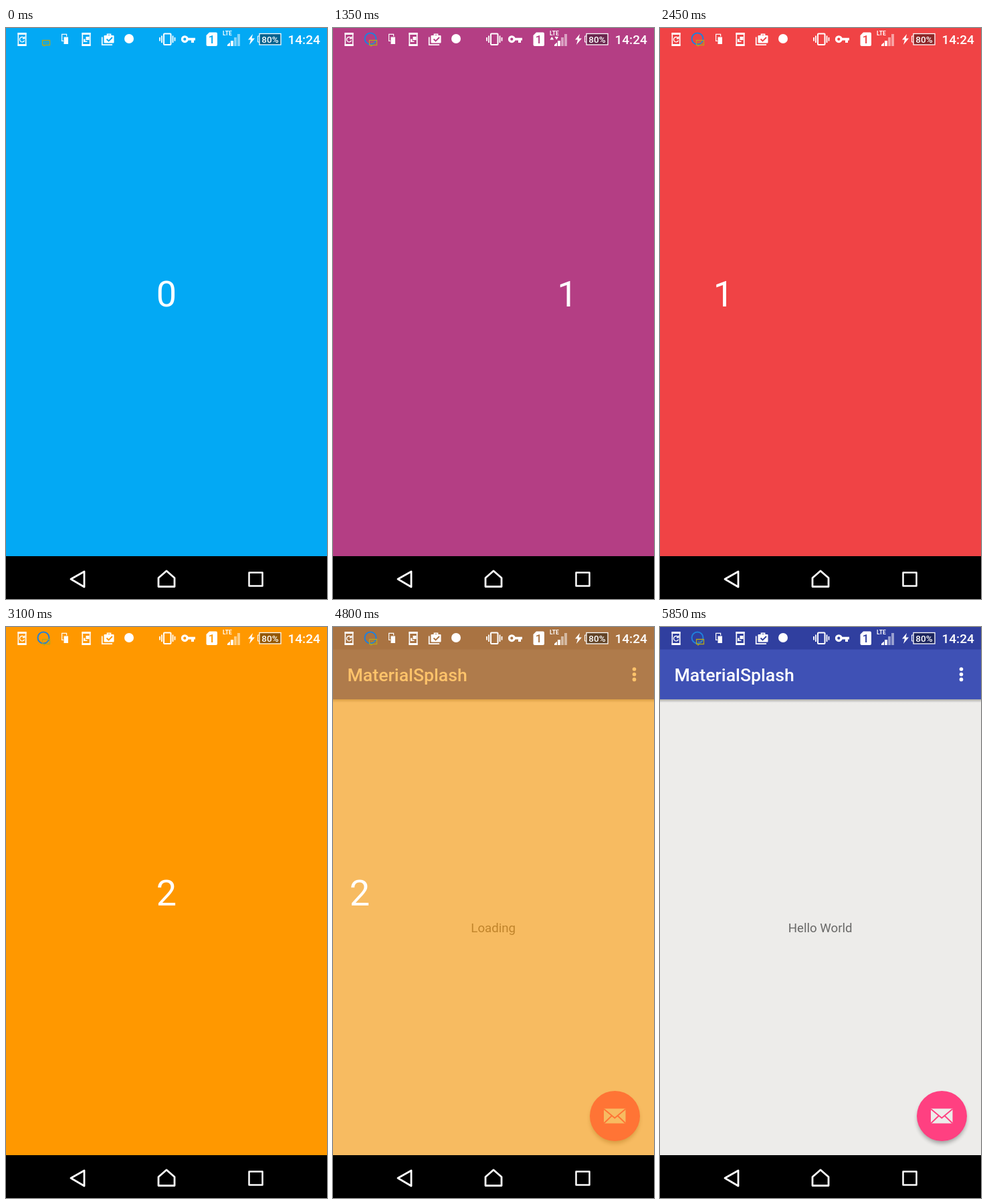
These frames come from a looping animation (480x853 px, 5.9 s). An HTML page:

```html
<!DOCTYPE html>
<html lang="en">
<head>
<meta charset="utf-8">
<title>Splash pager</title>
<style>
  html, body { margin: 0; width: 100%; height: 100%; overflow: hidden; background: #000; }
  svg { display: block; width: 100%; height: 100%; }
  text { font-family: Roboto, sans-serif; }
  .digits text { font-size: 54px; fill: #fff; text-anchor: middle; }
  .title { font-size: 26.67px; font-weight: 500; fill: #fff; }
  .body { font-size: 18.67px; fill: rgba(0, 0, 0, .56); text-anchor: middle; }
  .clock { font-size: 19px; font-weight: 500; }
  .line { fill: none; stroke: #fff; }
</style>
</head>
<body>
<svg viewBox="0 0 480 853">
  <defs>
    <filter id="soft" x="-30%" y="-30%" width="160%" height="160%"><feGaussianBlur stdDeviation="3"/></filter>
    <linearGradient id="edge" x2="0" y2="1">
      <stop stop-opacity=".28"/><stop offset="1" stop-opacity="0"/>
    </linearGradient>
    <mask id="simHole">
      <path d="M304 6.500h10q2 0 2 2v16.500q0 2-2 2h-12.500q-2 0-2-2v-14z" fill="#fff"/>
      <text x="307.500" y="23" font-size="17" font-weight="500" text-anchor="middle">1</text>
    </mask>
    <mask id="caseHole">
      <rect x="140" y="5" width="26" height="24" fill="#fff"/>
      <path d="M150.500 16.500l3 3 5.500-5.500" fill="none" stroke="#000" stroke-width="1.800"/>
    </mask>
  </defs>

  <g id="app">
    <rect width="480" height="789" fill="#edecea"/>
    <rect y="108" width="480" height="5" fill="url(#edge)"/>
    <rect width="480" height="108" fill="#3f51b5"/>
    <rect width="480" height="33.500" fill="#303f9f"/>
    <text class="title" x="21.500" y="81">MaterialSplash</text>
    <g fill="#fff">
      <circle cx="450.500" cy="63" r="2.800"/><circle cx="450.500" cy="70.700" r="2.800"/><circle cx="450.500" cy="78.400" r="2.800"/>
    </g>
    <text class="body" id="message" x="239.700" y="456">Loading</text>
    <circle cx="421.500" cy="735" r="36.500" opacity=".32" filter="url(#soft)"/>
    <circle cx="421.500" cy="730.500" r="37.500" fill="#ff4081"/>
    <rect x="405" y="719.500" width="32.500" height="22" fill="#edecea"/>
    <path d="M405 720l16.300 13.500L437.500 720M405 741.500l11.500-11M437.500 741.500l-11.500-11" fill="none" stroke="#ff4081" stroke-width="1.800"/>
  </g>

  <rect id="cover" width="480" height="789"/>
  <g class="digits" id="digits">
    <text x="240" y="415.500">0</text>
    <text x="720" y="415.500">1</text>
    <text x="1200" y="415.500">2</text>
  </g>

  <g id="status" fill="#fff">
    <path class="line" stroke-width="1.600" d="M18.300 8h11.400v18h-11.400z"/>
    <path d="M17.500 7h13v3h-13zM17.500 24h13v3h-13z"/>
    <path class="line" stroke-width="1.400" d="M27.300 15.200a3.700 3.700 0 1 0 .3 3.300M27.800 12.800v3h-3"/>

    <circle id="badge" cx="56" cy="16" r="8.500" fill="none" stroke="#1f80dc" stroke-width="2"/>
    <path d="M54.500 18.500h11v7h-6.500l-2 1.500v-1.500h-2.500z" fill="none" stroke="#b5a51c" stroke-width="1.300"/>
    <path d="M57 22h6" stroke="#b5a51c" stroke-dasharray="1.500 1"/>

    <path class="line" stroke-width="1.200" d="M86 19.400h-2.400v-10h7v3"/>
    <path d="M86.500 13.500h6.500v10.500h-6.500z"/>

    <path class="line" stroke-width="1.700" d="M114.300 8h11.400v18h-11.400z"/>
    <path d="M113.500 7h13v3h-13zM113.500 24h13v3h-13z"/>
    <path d="M119.500 13h5v5h-5zM116 16.500h2.500v3h3v1.500h-5.500z"/>

    <g mask="url(#caseHole)">
      <rect x="146.500" y="11" width="15" height="11.500" rx="1"/>
      <path class="line" stroke-width="1.700" d="M151.500 12v-2.700h5v2.700M143.700 13.500v11.700h15.300"/>
    </g>
    <circle cx="184" cy="16" r="7"/>

    <rect class="line" x="236" y="8.500" width="10.500" height="16.500" rx="1" stroke-width="2"/>
    <path class="line" stroke-width="1.800" d="M233 11.500v10.500M249.500 11.500v10.500M230 14v5.500M252.500 14v5.500"/>

    <circle class="line" cx="267.300" cy="16.700" r="3.800" stroke-width="3.300"/>
    <path d="M271.500 14.800h11.500v3.800h-2v3.400h-4v-3.400h-5.500z"/>

    <rect x="298" y="5" width="19" height="24" mask="url(#simHole)"/>

    <text x="324" y="11.300" font-size="8.500" font-weight="700">LTE</text>
    <path id="traffic" d="M324.500 17.500l2.800-4.500 2.800 4.500zM331.500 13h5.600l-2.800 4.500z"/>
    <path d="M331 27v-2l4-3.500v5.500zM336 27v-8h4v8z"/>
    <path opacity=".5" d="M341 27v-13h4v13zM346 27v-18h4v18z"/>

    <path d="M369 9l-7 8.500h4l-2 7.500 8-9.500h-4.500z"/>
    <path class="line" stroke-width="1" d="M379 12h-2.500v9h2.500"/>
    <rect x="379" y="8.500" width="32" height="16.500" fill="#000" fill-opacity=".42" stroke="#fff" stroke-width="1.300"/>
    <text x="395" y="21.500" font-size="13.500" font-weight="500" text-anchor="middle">80%</text>
    <text class="clock" x="421.500" y="24">14:24</text>
  </g>

  <rect y="789" width="480" height="64"/>
  <g class="line" stroke-width="2.800" stroke-linejoin="round">
    <path d="M97 823.300l20-11.300v23z"/>
    <path d="M240 811l12 10.500v13h-24v-13z"/>
    <path stroke-width="2.500" d="M363.500 813.500h20v20h-20z"/>
  </g>
</svg>

<script>
const LOOP = 5900, STEP = 50, LAG = 8;
const PAGES = [[3, 169, 244], [233, 30, 99], [255, 152, 0]];

// [time, pager position]: two flings, then one slow drag that reveals the app.
const TRACK = [
  [0, 0], [1100, 0], [1150, .09], [1350, .77], [1400, .87], [1450, .93], [1500, .966], [1600, .993], [1700, 1],
  [2300, 1], [2350, 1.05], [2400, 1.15], [2450, 1.302], [2550, 1.68], [2600, 1.82], [2650, 1.9], [2750, 1.975], [2900, 2],
  [3650, 2], [4300, 2.22], [4800, 2.417], [5200, 2.6], [5400, 2.78], [5550, 2.94], [5700, 3], [LOOP, 3]
];

const $ = id => document.getElementById(id);
const mix = (a, b, k) => a + (b - a) * k;

function position(t) {
  const i = TRACK.findIndex(key => key[0] > t);
  const [t0, p0] = TRACK[i - 1], [t1, p1] = TRACK[i];
  return mix(p0, p1, (t - t0) / (t1 - t0));
}

function pageColor(pos) {
  const i = Math.min(Math.floor(pos), 1), k = Math.min(pos - i, 1);
  return `rgb(${PAGES[i].map((c, n) => Math.round(mix(c, PAGES[i + 1][n], k)))})`;
}

function draw() {
  const t = Math.floor((performance.now() + LAG) % LOOP / STEP) * STEP;
  const pos = position(t);
  $('cover').setAttribute('fill', pageColor(pos));
  $('cover').setAttribute('opacity', Math.min(1, 3 - pos));
  $('digits').setAttribute('transform', `translate(${-480 * pos})`);
  $('badge').setAttribute('opacity', pos < .2 ? 0 : 1);
  $('traffic').setAttribute('opacity', t >= 600 && t < 1750 ? 1 : 0);
  $('message').textContent = t >= 5600 ? 'Hello World' : 'Loading';
  requestAnimationFrame(draw);
}
draw();
</script>
</body>
</html>
```
